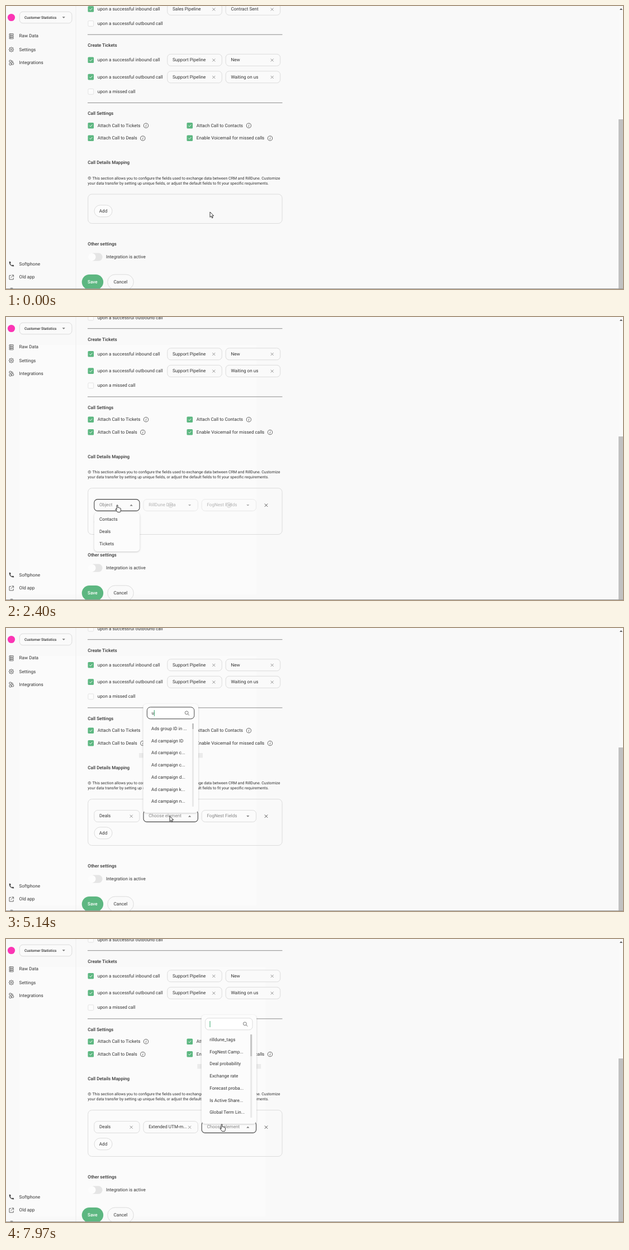
Write an HTML page that moves like this. It is 1104 by 507 pixels and loops after 8000 ms.

```html
<!DOCTYPE html>
<html lang="en">
<head>
<meta charset="utf-8">
<title>Call details mapping</title>
<style>
  html, body { margin: 0; width: 100%; height: 100%; overflow: hidden; background: #f9f9f9; }
  svg { display: block; width: 100vw; height: 100vh; }
  text { font-family: Roboto, Arial, sans-serif; font-size: 8.15px; fill: #333; white-space: pre; text-rendering: geometricPrecision; }
</style>
</head>
<body>
<svg id="stage" viewBox="0 0 1104 507">
  <g id="backdrop"></g>
  <g id="sections"></g>
  <g id="fixed"></g>
  <g id="live"></g>
</svg>
<script>
const LOOP = 8000;
const GREEN = '#5db781', INK = '#333', MUTED = '#858585', EDGE = '#dcdcdc';
const ROW_ADDED = 1440, ROW_HEIGHT = 30.5;
const layer = id => document.getElementById(id);

// Drawing helpers; text is placed by its vertical centre.
const text = (x, cy, s, attrs = '') => `<text x="${x}" y="${cy + 2.8}" ${attrs}>${s}</text>`;
const title = (cy, s) => text(146.3, cy, s, 'font-weight="500"');
const box = (x, y, w, h, r, fill, stroke = 'none', attrs = '') =>
  `<rect x="${x}" y="${y}" width="${w}" height="${h}" rx="${r}" fill="${fill}" stroke="${stroke}" ${attrs}/>`;
const line = (d, stroke = INK, width = 1, attrs = '') =>
  `<path d="${d}" fill="none" stroke="${stroke}" stroke-width="${width}" ${attrs}/>`;
const ring = (x, y, r, stroke, width = 0.9) =>
  `<circle cx="${x}" cy="${y}" r="${r}" fill="none" stroke="${stroke}" stroke-width="${width}"/>`;
const cross = (x, y, color = '#8a8a8a', r = 2.5) =>
  line(`M${x - r} ${y - r}l${2 * r} ${2 * r}m0 ${-2 * r}l${-2 * r} ${2 * r}`, color, 0.9);
const arrowHead = (x, y, up = false, color = '#777') =>
  `<path d="M${x - 2.6} ${y + (up ? 1.3 : -1.3)}h5.2l-2.6 ${up ? -2.7 : 2.7}z" fill="${color}"/>`;
const divider = y => line(`M146 ${y}H494.5`, '#8c8c8c', 1);

function checkbox(x, cy, label, checked = true, labelY = cy - 0.3) {
  const mark = checked
    ? box(x, cy - 5.3, 10.6, 10.6, 1.6, GREEN) + line(`M${x + 2.9} ${cy + 0.1}l1.8 1.8 3.2 -3.6`, '#fff', 0.9)
    : box(x + 0.4, cy - 4.9, 9.8, 9.8, 1.4, '#fcfcfc', EDGE, 'stroke-width=".8"');
  return mark + text(x + 17.3, labelY, label);
}

const tag = (x, cy, label) =>
  box(x, cy - 10.5, 97.5, 21, 6, '#fafafa', EDGE) + text(x + 9.2, cy - 0.4, label) + cross(x + 83, cy + 0.2);

const info = (x, y) =>
  ring(x, y, 4.1, '#555') + line(`M${x + 0.2} ${y - 0.6}l-.5 2.8m.8 -4.5v.9`, '#555', 0.9);

function pageSections() {
  return checkbox(146.5, 5.5, 'upon a successful inbound call') +
    tag(288.8, 5.8, 'Sales Pipeline') + tag(393.2, 5.8, 'Contract Sent') +
    checkbox(146.5, 31.5, 'upon a successful outbound call', false) +
    divider(51.2) +
    title(70.2, 'Create Tickets') +
    checkbox(146.5, 96.8, 'upon a successful inbound call') +
    tag(288.8, 96.8, 'Support Pipeline') + tag(393.2, 96.8, 'New') +
    checkbox(146.5, 127.1, 'upon a successful outbound call') +
    tag(288.8, 127.3, 'Support Pipeline') + tag(393.2, 127.3, 'Waiting on us') +
    checkbox(146.5, 153.4, 'upon a missed call', false) +
    divider(173.4) +
    title(192.2, 'Call Settings') +
    checkbox(146.5, 214.2, 'Attach Call to Tickets') + info(250.5, 214.2) +
    checkbox(146.5, 236.7, 'Attach Call to Deals') + info(244.8, 237) +
    checkbox(323.5, 214.2, 'Attach Call to Contacts') + info(434.4, 214.2) +
    checkbox(323.5, 236.7, 'Enable Voicemail for missed calls') + info(472.5, 237) +
    title(280.3, 'Call Details Mapping') +
    ring(149.3, 308.2, 2.3, '#444', 0.7) + line('M148.7 307.2l.7 -.4v2.8', '#444', 0.6) +
    text(154.4, 308, 'This section allows you to configure the fields used to exchange data between CRM and RillDune. Customize', 'style="font-size:7px"') +
    text(146.3, 316.8, 'your data transfer by setting up unique fields, or adjust the default fields to fit your specific requirements.', 'style="font-size:7px"');
}

function gear(x, y) {
  let d = '';
  for (let i = 0; i < 16; i++) {
    const r = i % 2 ? 3.1 : 4.5, a = i * Math.PI / 8;
    d += `${i ? 'L' : 'M'}${x + r * Math.cos(a)} ${y + r * Math.sin(a)}`;
  }
  return line(d + 'z', '#555', 0.9, 'stroke-linejoin="round"') + ring(x, y, 1.4, '#555');
}

function fixedParts() {
  const bars = [50.8, 54.1, 57.4].map(y =>
    box(6, y - 1.2, 7.2, 2.5, 0.5, 'none', '#555', 'stroke-width=".9"') + line(`M7.6 ${y}h1`, '#555', 0.8)).join('');
  const nodes = [[6, 97.2], [6, 102.4], [10, 101.6]].map(([x, y]) =>
    box(x, y, 3.6, 3.4, 0.8, 'none', '#555', 'stroke-width=".9"')).join('');
  return line('M125 0V507', '#ececec') +
    '<circle cx="9.5" cy="20.5" r="6.6" fill="#fb35b4"/>' +
    box(24.3, 10.3, 93.6, 20.5, 6, '#fafafa', EDGE) +
    text(33, 20.2, 'Customer Statistics', 'style="font-size:6.5px" font-weight="500"') + arrowHead(103.2, 20.6) +
    bars + gear(9.5, 78) + nodes + line('M9.6 98.8h2.5v2.8', '#555', 0.9) +
    text(23.6, 53.5, 'Raw Data') + text(23.6, 77.8, 'Settings') + text(23.6, 101.3, 'Integrations') +
    '<path d="M5.6 458l2.2 -.2 1 2.5 -1.3 1.2q1.2 2.2 3.2 3.2l1.2 -1.2 2.2 .9v2.1q-8.2 .2 -8.5 -8.5z" fill="#444"/>' +
    text(23.6, 461.9, 'Softphone') +
    line('M9 482.7H6v7.2h7.2v-3M10.3 482h3.3v3.3M13.4 482.2l-4.6 4.6', '#555', 0.9) +
    text(23.6, 485.6, 'Old app') + line('M7.5 506q2 -1.5 5 0', '#555', 0.9) +
    title(426, 'Other settings') +
    box(150, 442.6, 22.6, 14.2, 7.1, '#e5e5e5') + '<circle cx="153.9" cy="449.6" r="6.7" fill="#fdfdfd"/>' +
    text(179, 449, 'Integration is active') +
    box(135.7, 481, 38.5, 27, 13.5, GREEN) +
    text(154.9, 494.2, 'Save', 'text-anchor="middle" font-weight="500" style="fill:#fff"') +
    box(181.7, 481, 46.6, 27, 13.5, '#fafafa', EDGE) + text(204.9, 494.2, 'Cancel', 'text-anchor="middle"') +
    '<path d="M1098 7l2.6 -3 2.6 3z" fill="#555"/>' + line('M0 506.5H1104', '#999');
}

const clamp = v => Math.max(0, Math.min(1, v));
const progress = (t, from, to) => clamp((t - from) / (to - from));

// Pointer moves: start, end, target, curve control point.
const START = [365, 369];
const MOVES = [
  [30, 530, [184, 366], [230, 340]],
  [1750, 2050, [199, 337], [190, 350]],
  [2420, 2740, [209, 374], [206, 355]],
  [2980, 3480, [293, 337], [251, 355]],
  [6510, 6800, [291, 288], [294, 312]],
  [6950, 7300, [386, 332], [345, 306]]
];
const SHAPE_SWAPS = [500, 1790, 1950, 3020, 3430, 5080, 6600, 7050, 7200];

function pointer(t) {
  let at = START;
  for (const [from, to, target, bend] of MOVES) {
    if (t < from) break;
    const p = progress(t, from, to), e = p * p * (3 - 2 * p), q = 1 - e;
    at = at.map((v, i) => q * q * v + 2 * q * e * bend[i] + e * e * target[i]);
  }
  const hand = SHAPE_SWAPS.filter(s => t >= s).length % 2;
  const d = hand
    ? 'M-.9 1q0 -1.2 1 -1.2t1 1.2v3.6q1.3 -.7 2 .4 1.3 -.5 1.9 .6 1.4 -.3 1.4 1.2v2.4q0 1.4 -1.1 3.4h-4.7q-1 -1.8 -3.4 -4.6 -.4 -1.3 .6 -1.4t1.3 1.2z'
    : 'M0 0v9.4l2.2 -2 1.5 3.5 1.5 -.7 -1.5 -3.3h3z';
  return `<path d="${d}" transform="translate(${at})" fill="#fff" stroke="#222" stroke-width=".9" stroke-linejoin="round"/>`;
}

function field(x, w, label, { chosen, open, up, disabled, busy } = {}) {
  const y = 337, right = x + w - 14.8;
  const body = box(x, y - 10.4, w, 20.8, 6, '#fbfbfb', open ? '#444' : EDGE, open ? 'stroke-width="1.1"' : '') +
    text(x + 9.2, y - 0.4, label, chosen ? '' : `style="fill:${MUTED}"`) +
    (chosen ? cross(right, y + 0.2) : arrowHead(right, y + 0.2, up));
  const spinner = busy ? ring(x + w / 2, y, 4.2, '#999', 0.8) + ring(x + w / 2, y, 1.7, '#aaa', 0.7) : '';
  return `<g opacity="${disabled ? 0.6 : 1}">${body}${spinner}</g>`;
}

function menu(x, items, { query = '', caret, thumb, opacity }) {
  const cursorX = x + 14.8 + [...query].reduce((w, c) => w + { u: 4.5, t: 2.7, m: 7.1 }[c], 0);
  return `<g opacity="${opacity}">` +
    box(x - 8, 224, 114, 8.5, 0, '#ebebeb') +
    box(x - 0.5, 136, 98.5, 195, 6, '#fcfcfc', 'none', 'filter="drop-shadow(0 1px 1.5px #0003)"') +
    box(x + 6.4, 141.8, 84.4, 21, 6, '#fff', query ? '#444' : EDGE) +
    text(x + 14.4, 152.3, query) +
    (caret ? line(`M${cursorX} 147v11`, '#37a66c', 1) : '') +
    ring(x + 77.2, 151.8, 2.9, '#666') + line(`M${x + 79.4} 154l2.6 2.6`, '#666') +
    items.map((s, i) => text(x + 14.1, 180.2 + i * 21.7, s)).join('') +
    box(x + 87, 171, 3, 149, 0, '#e9e9e9') + box(x + 87, 171, 3, thumb, 0, '#c4c4c4') + '</g>';
}

const DATA_ITEMS = ['Ads group ID in ...', 'Ad campaign ID', ...[...'ccdkn'].map(c => `Ad campaign ${c}...`)];
const UTM_ITEMS = Array(7).fill('Extended UTM-...');
const FIELD_ITEMS = ['rilldune_tags', 'FogNest Camp...', 'Deal probability', 'Exchange rate',
  'Forecast proba...', 'Is Active Share...', 'Global Term Lin...'];

function objectMenu() {
  return box(157.8, 350, 81.5, 70, 6, '#fcfcfc', 'none', 'filter="drop-shadow(0 1px 1.5px #0003)"') +
    ['Contacts', 'Deals', 'Tickets'].map((s, i) => text(167, 362.5 + i * 21.7, s)).join('');
}

function mappingRow(t) {
  const picked = t >= 2960, mapped = t >= 6920;
  const dataOpen = t >= 4050 && !mapped, fieldsOpen = t >= 7600;
  return field(157.8, 81.2, picked ? 'Deals' : 'Object', { chosen: picked, open: t >= 2230 && !picked, up: t >= 2300 }) +
    field(246, 97.4, mapped ? 'Extended UTM-m...' : dataOpen ? 'Choose element' : 'RillDune Data',
      { chosen: mapped, open: dataOpen, up: t >= 4220, disabled: !picked, busy: !picked }) +
    field(350.2, 97.4, fieldsOpen ? 'Choose element' : 'FogNest Fields',
      { open: fieldsOpen, up: t >= 7760, disabled: t < 3620, busy: t < 3620 }) +
    cross(465.5, 337.2, '#444', 2.7);
}

function menus(t) {
  let out = '';
  if (t >= 2260 && t < 2960) out += objectMenu();
  if (t >= 4060 && t < 6920) {
    const query = 'utm'.slice(0, (t >= 5110) + (t >= 5300) + (t >= 5830));
    const caret = t >= 4250 && !(t >= 4740 && t < 5080) && !(t >= 5670 && t < 5830) && !(t >= 6360 && t < 6700);
    const filtered = t >= 5400;
    out += menu(246, filtered ? UTM_ITEMS : DATA_ITEMS,
      { query, caret, thumb: filtered ? 130 : 10, opacity: progress(t, 4040, 4130) });
  }
  if (t >= 7610) out += menu(350.2, FIELD_ITEMS, { caret: t >= 7790, thumb: 39, opacity: progress(t, 7590, 7690) });
  return out;
}

function draw(t) {
  const added = t >= ROW_ADDED, shift = added ? ROW_HEIGHT : 0;
  const thumbTop = added ? 214 : 203;
  const tintRight = t >= 7600 ? 464 : 448;
  layer('backdrop').innerHTML = box(1096, 0, 8, 507, 0, '#fafafa') + box(1096, thumbTop, 8, 303, 0, '#c1c1c1') +
    (t >= 2200 ? box(24, 50, tintRight - 24, 447, 0, '#fbfbfb') : '');
  layer('sections').setAttribute('transform', `translate(0 ${-shift})`);

  const hover = progress(t, 470, 560) * (1 - progress(t, 1440, 1640));
  const pulse = t >= 1360 && t < 1600 ? 1 - progress(t, 1400, 1600) : 0;
  layer('live').innerHTML =
    box(146.7, 337.1 - shift, 347.4, 52.4 + shift, 7, 'none', EDGE) +
    box(158, 356.8, 32, 21, 10.5, '#fcfcfc', EDGE) +
    box(158, 356.8, 32, 21, 10.5, '#ececec', EDGE, `opacity="${hover}"`) +
    text(174, 366.8, 'Add', 'text-anchor="middle"') +
    (added ? mappingRow(t) : '') + menus(t) +
    `<g opacity="${pulse}">${ring(185, 367, 5.8, '#555', 1)}</g>` + pointer(t);
}

layer('sections').innerHTML = pageSections();
layer('fixed').innerHTML = fixedParts();
const began = performance.now();
function tick() {
  draw((performance.now() - began) % LOOP);
  requestAnimationFrame(tick);
}
tick();
</script>
</body>
</html>
```
